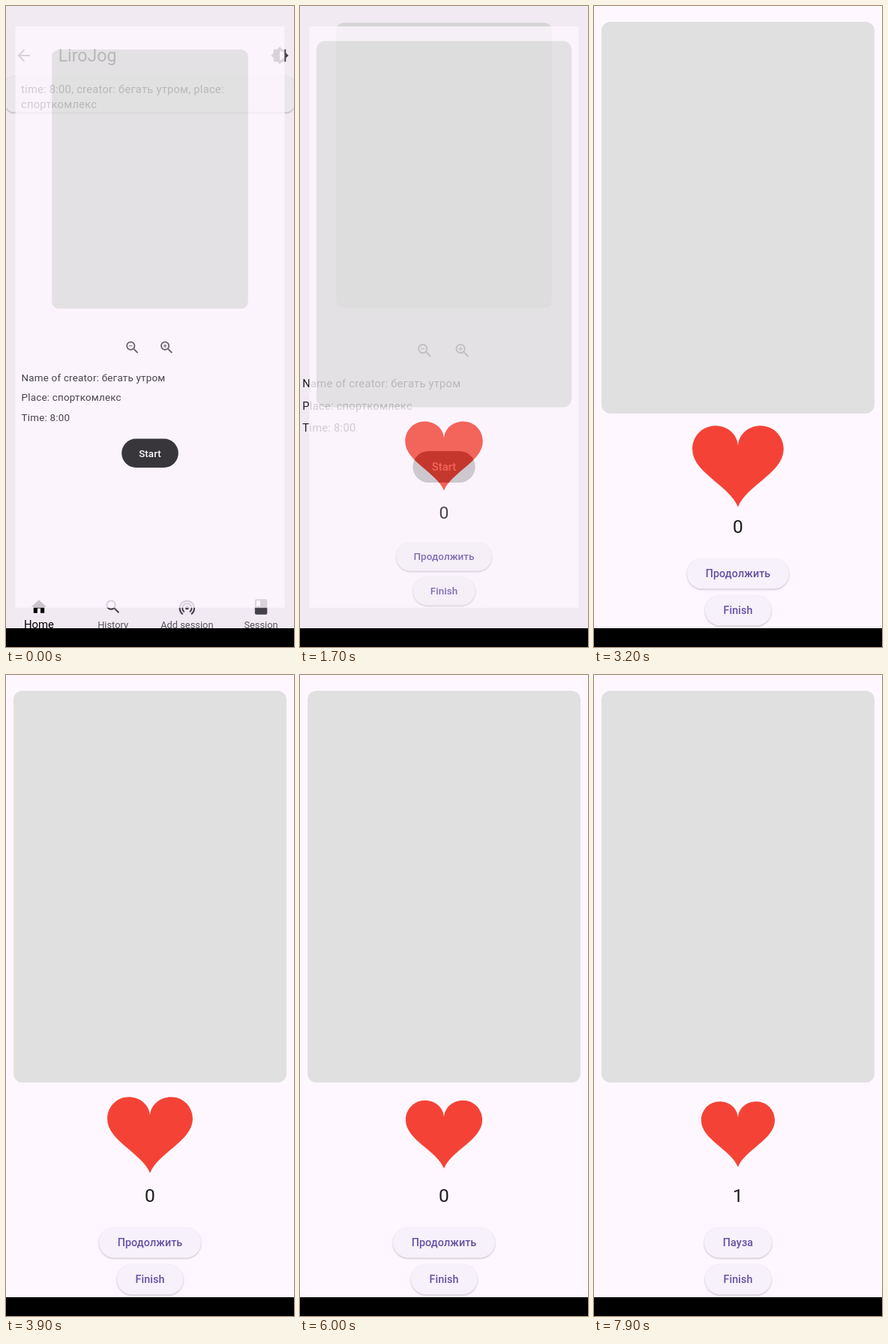
Write an HTML page that moves like this. It is 384x854 px and loops after 8 s.

```html
<!DOCTYPE html>
<html lang="ru">
<head>
<meta charset="utf-8">
<title>Running session</title>
<style>
  html, body { margin: 0; width: 100%; height: 100%; overflow: hidden; background: #000; }
  svg { display: block; width: 384px; height: 854px; font: 14.3px Roboto, sans-serif; fill: #1d1b20; }
  .page { fill: #fef7ff; }
  .body { letter-spacing: .25px; white-space: pre; }
  .map { fill: #e0e0e0; }
  .mid { text-anchor: middle; }
  .label { text-anchor: middle; font-weight: 500; letter-spacing: .1px; }
  .violet { fill: #6750a4; }
  .tab { text-anchor: middle; font-size: 12.5px; fill: #5c5862; }
  .line { fill: none; stroke: #49454f; stroke-width: 2; }
  .btn { fill: #f6f1fa; filter: drop-shadow(0 1px 1px rgba(0, 0, 0, .24)); }
</style>
</head>
<body>
<svg viewBox="0 0 384 854">
  <defs>
    <g id="lens" class="line">
      <circle cx="9.5" cy="9.5" r="5.5"/>
      <path d="M14 14l5.5 5.5"/>
    </g>
  </defs>

  <g id="home">
    <rect class="page" width="384" height="829"/>
    <path class="line" d="M36.5 75.5H21.5M29 68l-7.5 7.5L29 83"/>
    <text x="73" y="83.5" font-size="22.5">LiroJog</text>
    <path transform="translate(348.3 63.5)" fill="#49454f" fill-rule="evenodd" d="M20 15.3L23.3 12 20 8.7V4h-4.7L12 .7 8.7 4H4v4.7L.7 12 4 15.3V20h4.7l3.3 3.3 3.3-3.3H20zM12 18V6a6 6 0 0 1 0 12z"/>
    <rect x="4" y="102" width="376" height="47" rx="12" fill="#f7f2fa" style="filter:drop-shadow(0 1px 1px rgba(0,0,0,.3))"/>
    <g class="body">
      <text x="24.7" y="124.3">time: 8:00, creator: бегать утром, place:</text>
      <text x="24.7" y="143.7">спорткомлекс</text>
    </g>
    <path transform="translate(36 778)" fill="#000" d="M10 20v-6h4v6h5v-8h3L12 3 2 12h3v8z"/>
    <use href="#lens" x="132" y="778"/>
    <g class="line" transform="translate(240 791)">
      <circle r="1.5"/>
      <path d="M-3.5 5.5A6 6 0 1 1 3.5 5.5M-5.5 8.5A9.5 9.5 0 1 1 5.5 8.5"/>
    </g>
    <path transform="translate(324 778)" fill="#49454f" fill-rule="evenodd" d="M6 2h12a2 2 0 0 1 2 2v16a2 2 0 0 1-2 2H6a2 2 0 0 1-2-2V4a2 2 0 0 1 2-2zM6 4v8l2.500-1.500L11 12V4z"/>
    <text class="mid" x="48" y="817.5" font-size="14.5" fill="#000">Home</text>
    <text class="tab" x="144" y="817.5">History</text>
    <text class="tab" x="240" y="817.5">Add session</text>
    <text class="tab" x="336" y="817.5">Session</text>
  </g>

  <rect id="shade1" width="384" height="829" fill="#000"/>

  <g id="detail">
    <rect class="page" width="384" height="829"/>
    <rect class="map" x="52" y="33" width="280" height="369.500" rx="10"/>
    <use href="#lens" x="155" y="446"/>
    <use href="#lens" x="204" y="446"/>
    <path class="line" stroke-width="1" style="stroke-width:1.2" d="M162 455.500h5M211 455.500h5M213.500 453v5"/>
    <g class="body">
      <text x="8.5" y="505.500">Name of creator: бегать утром</text>
      <text x="8.5" y="534.300">Place:  спорткомлекс</text>
      <text x="8.5" y="563">Time: 8:00</text>
    </g>
    <rect x="151.500" y="588" width="81" height="41" rx="20.500" fill="#0c0a0e"/>
    <text class="label" x="192" y="613.700" fill="#fff">Start</text>
  </g>

  <rect id="shade2" width="384" height="829" fill="#000"/>

  <g id="run">
    <rect class="page" width="384" height="829"/>
    <rect class="map" x="10" y="21" width="364" height="522" rx="12"/>
    <path id="heart" fill="#f44336" d="M0-17C-1-30-12-38.500-25-38.500C-39-38.500-50-27-50-13C-50 13-9 27 0 50.500C9 27 50 13 50-13C50-27 39-38.500 25-38.500C12-38.500 1-30 0-17z"/>
    <text id="count" class="mid" x="192" y="701.700" font-size="24.500">0</text>
    <rect id="toggle" class="btn" y="736" height="40.500" rx="20.250"/>
    <text id="toggleText" class="label violet" x="192" y="761"></text>
    <rect class="btn" x="148" y="785" width="88.500" height="40.500" rx="20.250"/>
    <text class="label violet" x="192" y="810">Finish</text>
  </g>

  <rect y="829" width="384" height="25" fill="#000"/>
</svg>
<script>
  const LOOP = 8000, STEP = 100;
  const RESUME = 6500, TURN = 6620, TICK = 7500;
  const el = id => document.getElementById(id);
  const clamp = (v, a = 0, b = 1) => Math.min(b, Math.max(a, v));
  const span = (v, a, b) => clamp((v - a) / (b - a));

  function bezier(x, x1, y1, x2, y2) {
    const at = (t, a, b) => 3 * a * t * (1 - t) ** 2 + 3 * b * t * t * (1 - t) + t ** 3;
    let lo = 0, hi = 1;
    for (let i = 0; i < 24; i++) {
      const m = (lo + hi) / 2;
      if (at(m, x1, x2) < x) lo = m; else hi = m;
    }
    return at(lo, y1, y2);
  }

  // Two-part zoom curve: slow start, then a long settle.
  function zoomCurve(t) {
    const cut = 1 / 6;
    return t < cut
      ? .4 * bezier(t / cut, .05, 0, .1333, .06)
      : .4 + .6 * bezier((t - cut) / (1 - cut), .2083, .82, .25, 1);
  }

  function zoom(node, s) {
    node.setAttribute('transform', `translate(192 414.5) scale(${s}) translate(-192 -414.5)`);
  }

  const show = (node, on) => { node.style.display = on ? '' : 'none'; };

  function swap(under, shade, over, p) {
    const k = zoomCurve(p), busy = p < 1;
    show(under, busy);
    show(shade, busy);
    show(over, p > 0);
    zoom(under, 1 + .05 * k);
    zoom(over, .85 + .15 * k);
    shade.style.opacity = .6 * span(p, .2075, .4175);
    over.style.opacity = span(p, .125, .25);
  }

  function heartWidth(ms) {
    const t = ms > TURN ? 2 * TURN - ms : ms;
    return 110.4 + 12.2 * Math.cos(Math.PI * (t - 2900) / 2450);
  }

  function draw(ms) {
    // Each page change is already under way when its first step appears.
    const progress = start => ms < start ? 0 : clamp(.225 + (ms - start) / 300);
    if (ms < 1700) {
      swap(el('home'), el('shade1'), el('detail'), progress(0));
      show(el('shade2'), false);
      show(el('run'), false);
    } else {
      show(el('home'), false);
      show(el('shade1'), false);
      el('detail').style.opacity = 1;
      swap(el('detail'), el('shade2'), el('run'), progress(1700));
    }

    el('heart').setAttribute('transform', `translate(192 606) scale(${heartWidth(ms) / 100})`);
    el('count').textContent = ms < TICK ? 0 : 1;

    const running = ms >= RESUME, w = running ? 90 : 136;
    const press = running ? 1 - span(ms, 6600, 6900) : 0;
    const toggle = el('toggle');
    toggle.setAttribute('x', 192 - w / 2);
    toggle.setAttribute('width', w);
    toggle.style.fill = `rgb(${246 - 7 * press}, ${241 - 9 * press}, ${250 - 6 * press})`;
    el('toggleText').textContent = running ? 'Пауза' : 'Продолжить';
  }

  const begin = performance.now();
  function frame() {
    const ms = (performance.now() - begin) % LOOP;
    draw(Math.floor(ms / STEP) * STEP);
    requestAnimationFrame(frame);
  }
  frame();
</script>
</body>
</html>
```
